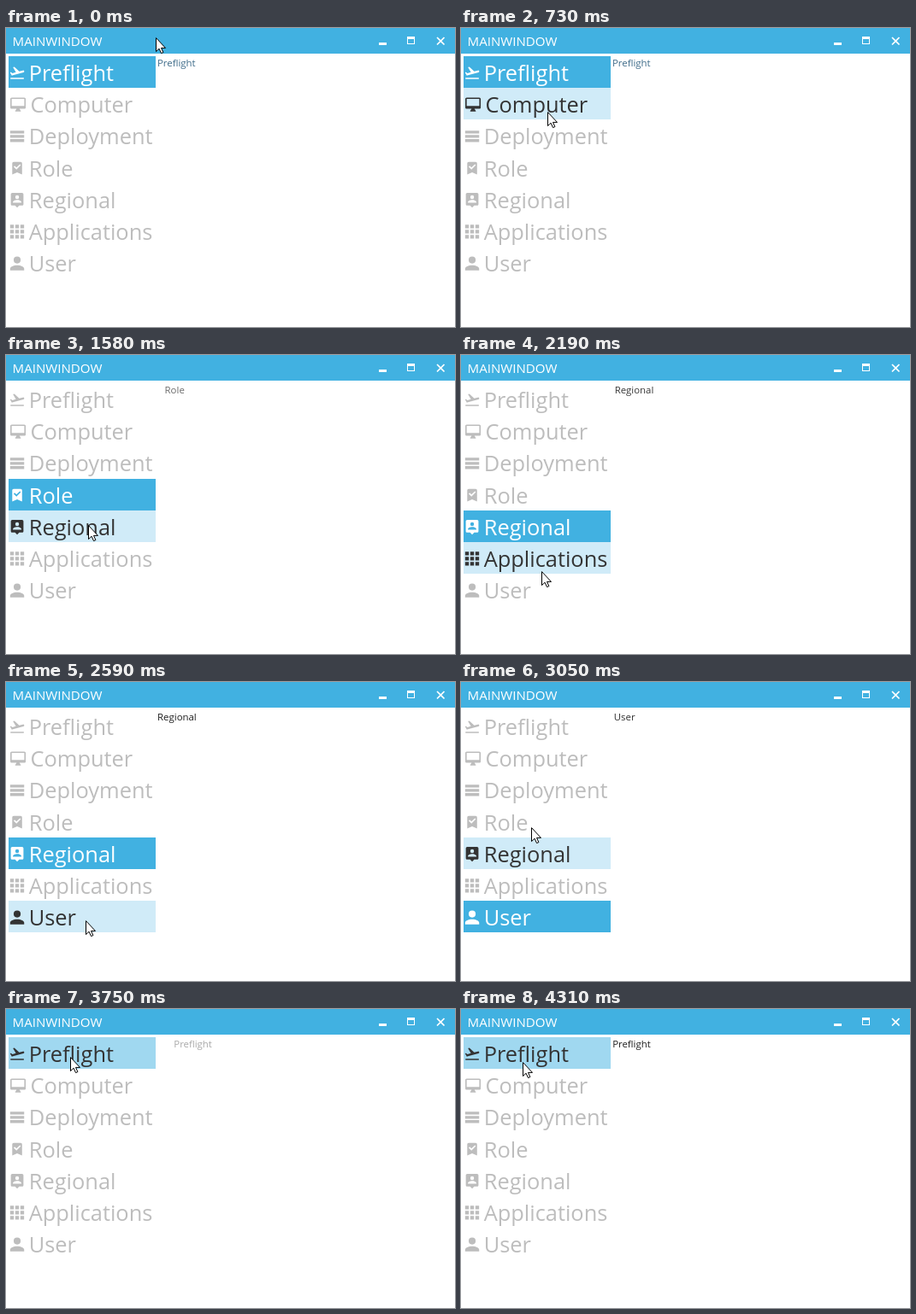
An HTML page for the animation above (4690 ms loop, 525 by 350 pixels).

```html
<!DOCTYPE html>
<html lang="en">
<head>
<meta charset="utf-8">
<title>Main window</title>
<style>
  html, body { margin: 0; width: 100%; height: 100%; overflow: hidden; background: #fff; }
  svg { display: block; width: 100vw; height: 100vh; }
  text { font-family: "Open Sans", "Noto Sans", sans-serif; white-space: pre; }
  .label { font-size: 25.4px; }
  .content { font-size: 11.4px; }
  .title { font-size: 15.1px; fill: #fff; }
</style>
</head>
<body>
<svg id="stage" viewBox="0 0 525 350">
  <rect width="525" height="350" fill="#fff"/>
  <rect width="525" height="30" fill="#41b1e1"/>
  <text class="title" x="7.5" y="21">MAINWINDOW</text>
  <g fill="#fff" shape-rendering="crispEdges">
    <rect x="436" y="17" width="9" height="3"/>
    <path fill-rule="evenodd" d="M469 10h9v9h-9zM470 13v5h7v-5z"/>
  </g>
  <path d="M504 11l8.5 8.5m0-8.5l-8.5 8.5" stroke="#fff" stroke-width="1.7"/>
  <g id="menu"></g>
  <text id="content" class="content" y="45"></text>
  <path id="cursor" d="M.5.6v16l3.6-3.4 2.4 5.4 2.4-1-2.4-5.2h5z" fill="#fff" stroke="#000"/>
</svg>
<script>
const LOOP = 4690, START = 270, STEP = 77.2, LAST = 52;
const ROW_TOP = 33, ROW_H = 37.2, ROW_W = 172;

const square = (x, y, w, h) => `M${x} ${y}h${w}v${h}h${-w}z`;
const bars = [4, 10, 16].map(y => square(2, y, 20, 4)).join("");
const grid = [2, 9.3, 16.6].map(y =>
  [2, 9.3, 16.6].map(x => square(x, y, 5.3, 5.3)).join("")).join("");

const items = [
  ["Preflight", "M2.5 19h19v2h-19zM22.07 9.64c-.21-.8-1.04-1.28-1.84-1.06L14.92 10 8 3.57l-1.91.51 4.14 7.17-4.97 1.33-1.97-1.54-1.45.39 2.59 4.49 1.6-.42L21 11.5c.81-.26 1.28-1.06 1.07-1.86z"],
  ["Computer", "M21 2H3c-1.1 0-2 .9-2 2v12c0 1.1.9 2 2 2h7l-2 3v1h8v-1l-2-3h7c1.1 0 2-.9 2-2V4c0-1.1-.9-2-2-2zm0 12H3V4h18z"],
  ["Deployment", bars],
  ["Role", "M17 3a2 2 0 0 1 2 2v16l-7-3-7 3V5c0-1.1.9-2 2-2zM11 14l6.25-6.24-1.41-1.42L11 11.18 8.41 8.59 7 10z"],
  ["Regional", "M19 2H5c-1.1 0-2 .9-2 2v14c0 1.1.9 2 2 2h4l3 3 3-3h4c1.1 0 2-.9 2-2V4c0-1.1-.9-2-2-2zm-7 3.3a2.7 2.7 0 0 1 0 5.4 2.7 2.7 0 0 1 0-5.4zM18 16H6v-.9c0-2 4-3.1 6-3.1s6 1.1 6 3.1z"],
  ["Applications", grid],
  ["User", "M12 2a5 5 0 0 1 0 10 5 5 0 0 1 0-10zM12 14.5c5.5 0 10 2.2 10 5V22H2v-2.5c0-2.8 4.5-5 10-5z"]
];

// Clicks: selection time, row, time the text appears, its first offset
const clicks = [
  [0, 0, 0, 0],
  [1345, 3, 1500, 18],
  [1885, 4, 1885, 45],
  [2660, 6, 2660, 60],
  [3655, 0, 3740, 20]
];

// Pointer path: time, x, y
const path = [
  [200, 175, 11], [730, 101, 98], [1270, 97, 178], [1350, 97, 179],
  [1580, 96, 199], [1810, 96, 211], [1890, 95, 214], [2190, 94, 252],
  [2360, 93, 272], [2440, 93, 278], [2670, 93, 280], [2750, 92, 275],
  [3050, 82, 170], [3430, 75, 65], [3510, 75, 56], [3750, 75, 56], [4150, 72, 62]
];

const styles = {
  idle: ["none", "#bdbdbd"],
  hover: ["#d0ebf8", "#333"],
  selected: ["#41b1e1", "#fff"],
  both: ["#a0d8f0", "#333"]
};

const byId = id => document.getElementById(id);
const content = byId("content"), cursor = byId("cursor");

function add(parent, tag, attrs) {
  const el = document.createElementNS("http://www.w3.org/2000/svg", tag);
  for (const key in attrs) el.setAttribute(key, attrs[key]);
  return parent.appendChild(el);
}

const rows = items.map(([name, icon], i) => {
  const top = ROW_TOP + ROW_H * i, y = Math.round(top);
  const wide = name === "Computer";
  const group = add(byId("menu"), "g", {});
  const back = add(group, "rect", {
    x: 3, y, width: ROW_W, height: Math.round(top + ROW_H) - y
  });
  add(group, "path", {
    d: icon, "fill-rule": "evenodd",
    transform: `translate(${wide ? 4.2 : 3.2} ${top + 9.6}) scale(.82)`
  });
  add(group, "text", { class: "label", x: wide ? 28.5 : 26.7, y: y + 29 }).textContent = name;
  return { group, back };
});

function pointer(t) {
  if (t <= path[0][0]) return path[0].slice(1);
  const i = path.findIndex(p => p[0] > t);
  if (i < 0) return path[path.length - 1].slice(1);
  const [t0, x0, y0] = path[i - 1], [t1, x1, y1] = path[i];
  const k = (t - t0) / (t1 - t0);
  return [x0 + (x1 - x0) * k, y0 + (y1 - y0) * k];
}

function rowAt([x, y]) {
  return x >= 3 && x < 3 + ROW_W ? Math.floor((y - ROW_TOP) / ROW_H) : -1;
}

function draw(time) {
  // The screen updates about 13 times a second
  const n = Math.min(LAST, Math.floor((time - START) / STEP + 0.2));
  const t = n < 0 ? 0 : START + n * STEP;

  const [, selected, shown, first] = clicks.filter(c => c[0] <= t).pop();
  const hovered = rowAt(pointer(t - STEP)); // highlight trails the pointer by one update
  rows.forEach(({ group, back }, i) => {
    const state = i === selected ? (i === hovered ? "both" : "selected")
      : i === hovered ? "hover" : "idle";
    const [fill, ink] = styles[state];
    back.setAttribute("fill", fill);
    group.setAttribute("fill", ink);
  });

  const offset = first * 2 ** (-(t - shown) / STEP);
  content.textContent = t >= shown ? items[selected][0] : "";
  content.setAttribute("x", 177 + offset);
  content.setAttribute("opacity", Math.exp(-offset / 20));
  content.setAttribute("fill", shown ? "#1c1c1c" : "#3f6c8a");

  const [x, y] = pointer(t).map(Math.round);
  cursor.setAttribute("transform", `translate(${x} ${y})`);
}

const begin = performance.now();
function tick() {
  draw((performance.now() - begin) % LOOP);
  requestAnimationFrame(tick);
}
tick();
</script>
</body>
</html>
```
